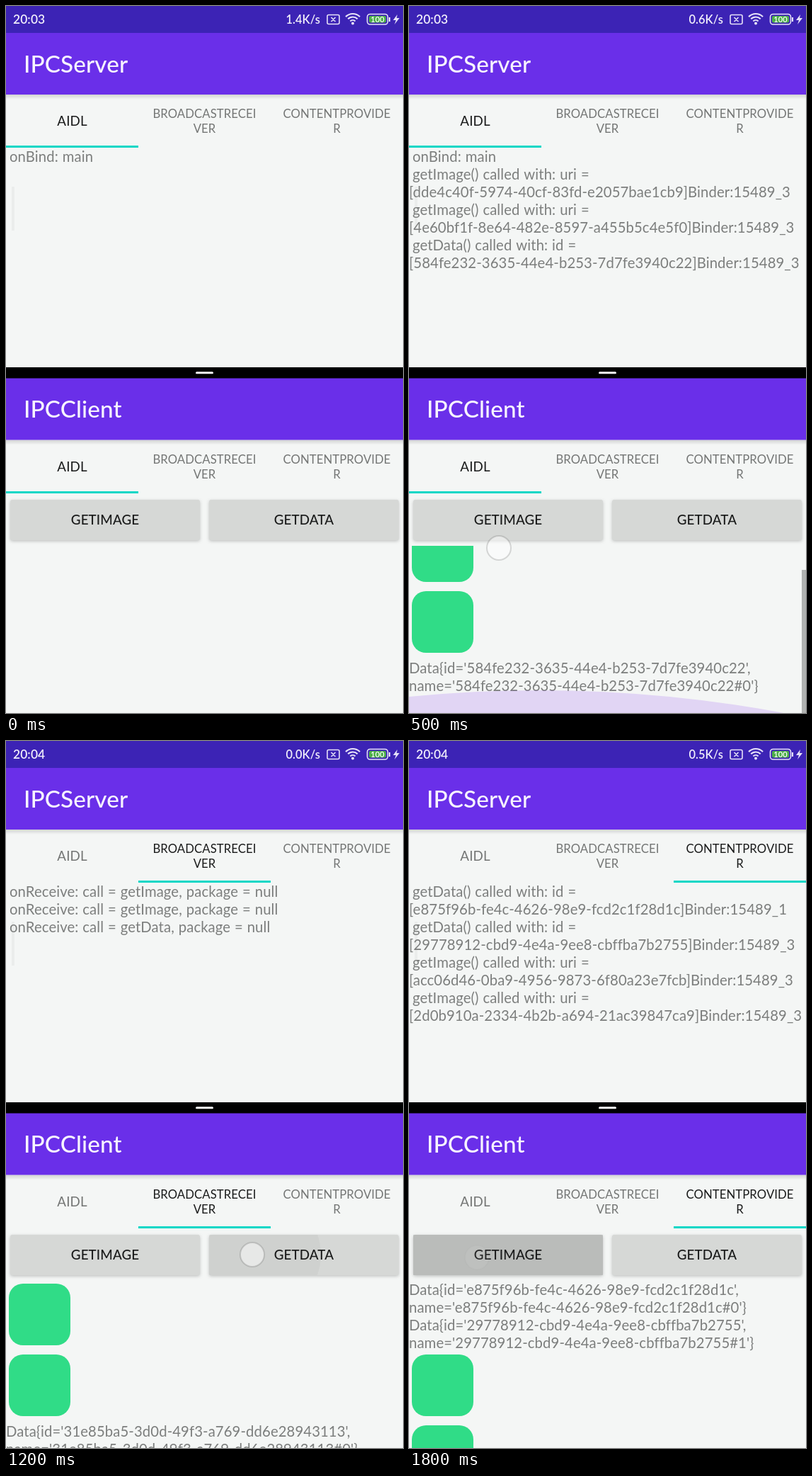
Animation, 561 px wide and 998 px high, one loop 1900 ms. Source, as an HTML page with a canvas:

```html
<!DOCTYPE html>
<html lang="en">
<head>
<meta charset="utf-8">
<title>IPC demo</title>
<style>
html, body { margin: 0; width: 100%; height: 100%; overflow: hidden; background: #f4f6f5; }
canvas { display: block; }
</style>
</head>
<body>
<canvas id="stage" width="561" height="998"></canvas>
<script>
const c = document.getElementById('stage').getContext('2d');
const W = 561, H = 998, TAB = 187, LOOP = 1900;
const BG = '#f4f6f5', PURPLE = '#6a2fe9', TEAL = '#0bd7c6', GREY = '#747675', LOG = '#7c7e7d', INK = '#1a1b1b';
const TABS = [['AIDL'], ['BROADCASTRECEI', 'VER'], ['CONTENTPROVIDE', 'R']];

const call = (name, key, id, thread = 3) =>
  [name + '() called with: ' + key + ' =', '[' + id + ']Binder:15489_' + thread];
const receive = name => ['onReceive: call = ' + name + ', package = null'];
const data = (id, n) => ["Data{id='" + id + "',", "name='" + id + '#' + n + "'}"];
const IMAGE = null;

const ids = {
  a: '584fe232-3635-44e4-b253-7d7fe3940c22', b: '23dab12e-9091-4bdb-b7e0-6b265a7324bb',
  c: '31e85ba5-3d0d-49f3-a769-dd6e28943113',
  d: 'e875f96b-fe4c-4626-98e9-fcd2c1f28d1c', e: '29778912-cbd9-4e4a-9ee8-cbffba7b2755'
};
const logs = [
  [['onBind: main'],
    call('getImage', 'uri', 'dde4c40f-5974-40cf-83fd-e2057bae1cb9'),
    call('getImage', 'uri', '4e60bf1f-8e64-482e-8597-a455b5c4e5f0'),
    call('getData', 'id', ids.a), call('getData', 'id', ids.b)],
  ['getImage', 'getImage', 'getData', 'getData'].map(receive),
  [call('getData', 'id', ids.d, 1), call('getData', 'id', ids.e),
    call('getImage', 'uri', 'acc06d46-0ba9-4956-9873-6f80a23e7fcb'),
    call('getImage', 'uri', '2d0b910a-2334-4b2b-a694-21ac39847ca9')]
];
const pages = [
  [IMAGE, IMAGE, data(ids.a, 0), data(ids.b, 1)],
  [IMAGE, IMAGE, data(ids.c, 0)],
  [data(ids.d, 0), data(ids.e, 1), IMAGE, IMAGE]
];

const LEFT = [6, 697, 268, 57], RIGHT = [287, 697, 268, 57], LAST_TAB = [374, 613, 187, 75];

// Each step overrides the state left by the one before; touch, ripple and glow last one step.
const steps = [
  { at: 0, speed: '1.4', clock: '20:03', server: 0, calls: 1, pos: 0, items: 0, scroll: 0 },
  { at: 200, speed: '0.6', calls: 2, touch: [100, 727, 1], ripple: [LEFT, 114, 726, 106, .13] },
  { at: 300, calls: 3, items: 2 },
  { at: 400, calls: 4, items: 3 },
  { at: 500, scroll: 40, touch: [127, 765, 1], glow: true },
  { at: 600, calls: 5, items: 4 },
  { at: 800, speed: '0.5', clock: '20:04', server: 1, calls: 0 },
  { at: 900, pos: 1, items: 0, scroll: 0 },
  { at: 1000, calls: 1, items: 1 },
  { at: 1100, calls: 2, items: 2 },
  { at: 1200, speed: '0.0', calls: 3, items: 3, touch: [348, 725, 1], ripple: [RIGHT, 360, 725, 85, .03] },
  { at: 1300, calls: 4 },
  { at: 1400, speed: '0.5', server: 2, calls: 0, pos: 1.427, touch: [435, 668, 1], ripple: [LAST_TAB, 460, 655, 87, .24] },
  { at: 1500, pos: 2, calls: 1, items: 1 },
  { at: 1600, calls: 2, items: 2 },
  { at: 1700, calls: 3, items: 3 },
  { at: 1800, calls: 4, items: 4, touch: [96, 729, .12], ripple: [LEFT, 140, 725, 200, .13] }
];
const states = [];
steps.forEach((s, i) => states.push({ ...states[i - 1], touch: null, ripple: null, glow: false, ...s }));

function rect(x, y, w, h, fill) {
  c.fillStyle = fill;
  c.fillRect(x, y, w, h);
}
function round(x, y, w, h, r, fill) {
  c.beginPath();
  c.roundRect(x, y, w, h, r);
  c.fillStyle = fill;
  c.fill();
}
function disc(x, y, r, fill) {
  c.beginPath();
  c.arc(x, y, r, 0, 7);
  c.fillStyle = fill;
  c.fill();
}
function text(str, x, y, size, fill, align = 'left', weight = 400) {
  c.font = weight + ' ' + size + 'px Lato, sans-serif';
  c.letterSpacing = '0.1px';
  c.wordSpacing = '0.6px';
  c.textAlign = align;
  c.fillStyle = fill;
  c.fillText(str, x, y);
}
function clipped(x, y, w, h, draw) {
  c.save();
  c.beginPath();
  c.rect(x, y, w, h);
  c.clip();
  draw();
  c.restore();
}

function statusBar(s) {
  rect(0, 0, W, 38, '#3c23b5');
  text(s.clock, 10, 25, 17.4, '#f0eefb', 'left', 600);
  text(s.speed + 'K/s', 444, 25, 16.4, '#f0eefb', 'right', 600);
  c.strokeStyle = '#e6e2f8';
  c.lineWidth = 1.6;
  c.beginPath();
  c.roundRect(454, 12.5, 17, 13, 2);
  c.moveTo(459.5, 16); c.lineTo(465.5, 22);
  c.moveTo(465.5, 16); c.lineTo(459.5, 22);
  c.stroke();
  c.lineWidth = 2.2;
  for (const r of [5, 9.5, 14]) {
    c.beginPath();
    c.arc(490, 25, r, -2.36, -.78);
    c.stroke();
  }
  disc(490, 24.5, 2, '#e6e2f8');
  c.lineWidth = 1.6;
  c.beginPath();
  c.roundRect(510.5, 11.5, 29, 14.5, 4);
  c.stroke();
  round(513, 14, 24, 9.5, 2, '#4cae48');
  rect(541, 16, 2, 6, '#e6e2f8');
  text('100', 525, 23, 11, '#fff', 'center', 600);
  c.beginPath();
  [[553, 12], [547, 20], [551, 20], [549, 26], [556, 17], [552, 17]].forEach(p => c.lineTo(...p));
  c.fillStyle = '#e6e2f8';
  c.fill();
}

function appBar(title, y) {
  const shade = c.createLinearGradient(0, y + 87, 0, y + 94);
  shade.addColorStop(0, 'rgba(0,0,0,.14)');
  shade.addColorStop(1, 'rgba(0,0,0,0)');
  rect(0, y + 87, W, 7, shade);
  rect(0, y, W, 87, PURPLE);
  text(title, 25, y + 55.5, 33.3, '#f7f4fe', 'left', 500);
}

function tabBar(y, selected, indicator) {
  TABS.forEach((lines, i) => {
    const fill = i === selected ? INK : GREY, mid = TAB * (i + .5);
    if (lines.length === 1) text(lines[0], mid, y + 44, 18.8, fill, 'center');
    else lines.forEach((line, n) => text(line, mid, y + 33 + 21 * n, 16.7, fill, 'center'));
  });
  rect(indicator * TAB, y + 72, TAB, 3, TEAL);
}

function ripple(r) {
  const [box, x, y, radius, alpha] = r;
  clipped(...box, () => disc(x, y, radius, 'rgba(0,0,0,' + alpha + ')'));
}

function button(box) {
  c.save();
  c.shadowColor = 'rgba(0,0,0,.22)';
  c.shadowBlur = 4;
  c.shadowOffsetY = 1.5;
  round(...box, 3, '#d6d8d6');
  c.restore();
}

function page(index, s) {
  button(LEFT);
  button(RIGHT);
  if (s.ripple && s.ripple[0] !== LAST_TAB) ripple(s.ripple);
  text('GETIMAGE', 140, 732, 18.8, INK, 'center', 500);
  text('GETDATA', 421, 732, 18.8, INK, 'center', 500);
  const count = index === Math.floor(s.pos) ? s.items : 0;
  clipped(0, 762, W, H - 762, () => {
    let y = 762 - s.scroll;
    for (const item of pages[index].slice(0, count)) {
      if (item === IMAGE) {
        round(4, y + 4, 87, 87, 20, '#30dc87');
        y += 100;
      } else {
        item.forEach((line, n) => text(line, 0, y + 20 + 25 * n, 20.3, LOG));
        y += 50;
      }
    }
  });
}

function server(s) {
  rect(8, 255, 4, 62, 'rgba(0,0,0,.035)');
  logs[s.server].slice(0, s.calls).flat().forEach((line, i) =>
    text(line, line[0] === '[' ? 0 : 5, 219.5 + 25 * i, 20.3, LOG));
  tabBar(125, s.server, s.server);
  appBar('IPCServer', 38);
  statusBar(s);
}

function client(s) {
  const first = Math.floor(s.pos), last = Math.ceil(s.pos);
  for (let i = first; i <= last; i++) {
    c.save();
    c.translate(Math.round((i - s.pos) * W), 0);
    page(i, s);
    c.restore();
  }
  if (s.ripple && s.ripple[0] === LAST_TAB) ripple(s.ripple);
  tabBar(613, last, first);
  appBar('IPCClient', 525.5);
  if (s.glow) {
    disc(184, 966 + 1880, 1880, 'rgba(130,50,235,.17)');
    rect(555, 796, 6, H - 796, '#b0b2b1');
  }
}

function touch(x, y, alpha) {
  c.globalAlpha = alpha;
  disc(x, y, 17, 'rgba(255,255,255,.5)');
  c.strokeStyle = 'rgba(0,0,0,.14)';
  c.lineWidth = 2;
  c.stroke();
  c.globalAlpha = 1;
}

function frame() {
  const t = performance.now() % LOOP;
  const s = states.findLast(state => state.at <= t);
  rect(0, 0, W, H, BG);
  server(s);
  rect(0, 510, W, 16, '#000');
  round(268, 516.3, 25, 3, 1.5, '#f2f2f2');
  client(s);
  if (s.touch) touch(...s.touch);
  requestAnimationFrame(frame);
}
frame();
</script>
</body>
</html>
```
